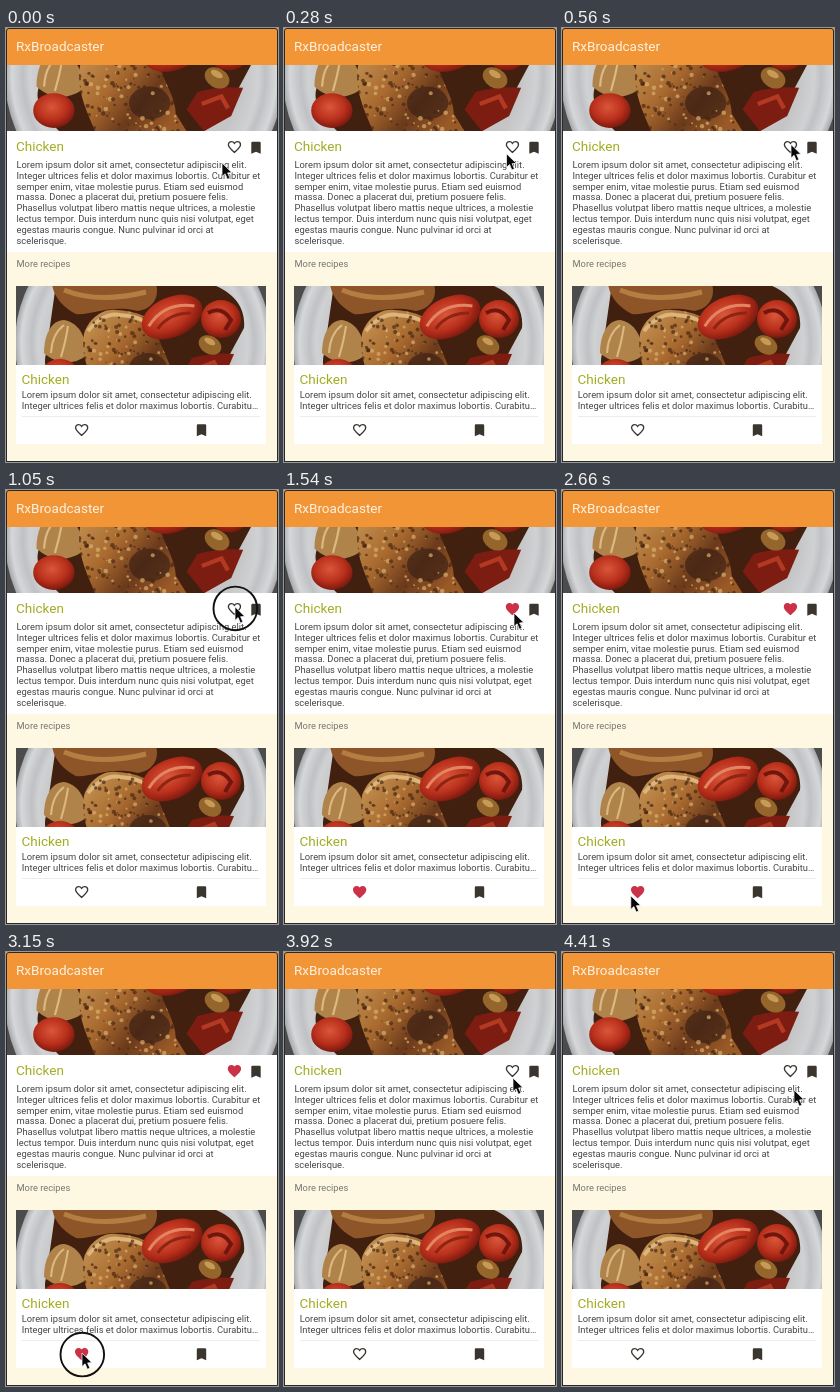
Animation of 272 by 434 pixels, one loop 4.48 s. Source, as an HTML page:

```html
<!DOCTYPE html>
<html lang="en">
<head>
<meta charset="utf-8">
<title>Recipes</title>
<style>
html, body { margin: 0; width: 100%; height: 100%; overflow: hidden; background: #fef7e2; }
svg { display: block; width: 272px; height: 434px; font-family: Roboto, "Open Sans", sans-serif; }
.title { font-size: 13.5px; fill: #a3ad24; }
.body { font-size: 9.36px; fill: #454545; }
.off { fill: none; stroke: #3b3530; stroke-width: 2; }
.on { fill: #cb3247; stroke: none; }
</style>
</head>
<body>
<svg viewBox="0 0 272 434">
  <defs>
    <clipPath id="cardClip"><rect x="10" y="258" width="250" height="79"/></clipPath>
    <clipPath id="topClip"><rect y="37" width="272" height="66"/></clipPath>
    <clipPath id="meatClip">
      <path id="meatShape" d="M78 306C82 292 96 280 110 282C128 283 146 288 150 300C153 318 166 334 166 350L176 366H92C84 348 74 326 78 306Z"/>
    </clipPath>
    <radialGradient id="plate" gradientUnits="userSpaceOnUse" cx="137" cy="315" r="128">
      <stop offset=".7" stop-color="#c5c5c6"/>
      <stop offset=".82" stop-color="#d0d1d3"/>
      <stop offset=".87" stop-color="#bfc1c4"/>
      <stop offset=".95" stop-color="#d5d7d9"/>
      <stop offset="1" stop-color="#a5a8ab"/>
    </radialGradient>
    <linearGradient id="meat" x1="0" y1="0" x2="1" y2=".7">
      <stop offset="0" stop-color="#c99a58"/>
      <stop offset=".45" stop-color="#a8692f"/>
      <stop offset=".72" stop-color="#6b3a1b"/>
      <stop offset="1" stop-color="#9a5a28"/>
    </linearGradient>
    <radialGradient id="tomato" cx=".45" cy=".4" r=".62">
      <stop offset="0" stop-color="#d9573a"/>
      <stop offset=".6" stop-color="#b92f1b"/>
      <stop offset="1" stop-color="#76170e"/>
    </radialGradient>
    <g id="photo">
      <rect x="10" y="258" width="250" height="109" fill="#4d4c4d"/>
      <circle cx="137" cy="315" r="128" fill="url(#plate)"/>
      <path d="M50 256H205C228 264 240 280 238 300L224 326L214 352L190 367H60C44 352 36 340 40 326Z" fill="#41200f"/>
      <path d="M38 325C38 306 46 292 58 292C72 294 82 310 80 328C66 338 50 336 38 325Z" fill="#b0834a"/>
      <path d="M45 325Q46 306 58 297M55 329Q60 312 62 298" fill="none" stroke="#dcb982" stroke-width="2"/>
      <path d="M46 256H150C154 270 146 281 132 283C104 276 84 288 70 286C58 280 48 270 46 256Z" fill="#8d5528"/>
      <path d="M58 262Q92 276 140 264" fill="none" stroke="#b67d42" stroke-width="5"/>
      <ellipse cx="54" cy="347" rx="19" ry="16" fill="url(#tomato)"/>
      <use href="#meatShape" fill="url(#meat)"/>
      <path d="M82 303Q98 284 114 287Q133 288 145 297" fill="none" stroke="#dbb57c" stroke-width="4"/>
      <ellipse cx="142" cy="340" rx="19" ry="15" fill="#3a2015" opacity=".65"/>
      <g id="pepper" clip-path="url(#meatClip)"></g>
      <g transform="rotate(-24 166 289)">
        <ellipse cx="166" cy="289" rx="32" ry="20" fill="url(#tomato)"/>
        <path d="M141 288Q165 272 191 288" fill="none" stroke="#e38562" stroke-width="3"/>
        <path d="M148 294Q165 284 185 293" fill="none" stroke="#8e2412" stroke-width="3"/>
      </g>
      <ellipse cx="215" cy="291" rx="20" ry="19" fill="url(#tomato)"/>
      <path d="M202 285Q216 277 225 292L219 302" fill="none" stroke="#70160f" stroke-width="4"/>
      <path d="M186 330Q206 324 228 326L217 352L192 366L176 346Z" fill="#7d1c10"/>
      <path d="M190 341L208 334L214 345" fill="none" stroke="#b23a22" stroke-width="4"/>
      <g transform="rotate(30 204 317)">
        <ellipse cx="204" cy="317" rx="12" ry="9" fill="#94662c"/>
        <ellipse cx="202" cy="314" rx="6" ry="3" fill="#c79b56"/>
      </g>
    </g>
    <path id="heart" d="M12 20L10.5 18.6C5.8 14.4 3 11.8 3 8.5C3 5.9 4.9 4 7.5 4C9.3 4 11 5 12 6.5C13 5 14.7 4 16.5 4C19.1 4 21 5.9 21 8.5C21 11.8 18.2 14.4 13.5 18.6Z"/>
    <path id="fullHeart" d="M12 21.3L10.5 20C5.4 15.4 2 12.3 2 8.5C2 5.4 4.4 3 7.5 3C9.2 3 10.9 3.8 12 5.1C13.1 3.8 14.8 3 16.5 3C19.6 3 22 5.4 22 8.5C22 12.3 18.6 15.4 13.5 20Z"/>
    <path id="mark" d="M1.2 0H8.2Q9.4 0 9.4 1.2V12L4.7 10L0 12V1.2Q0 0 1.2 0Z" fill="#3b3530"/>
  </defs>

  <rect width="272" height="434" fill="#fef7e2"/>
  <rect y="103" width="272" height="121" fill="#fff"/>
  <g clip-path="url(#topClip)">
    <use href="#photo" transform="translate(-10.9 -295) scale(1.088)"/>
  </g>
  <rect width="272" height="37" fill="#f29537"/>
  <text x="10" y="23" font-size="13.5" fill="#fdf1e0">RxBroadcaster</text>
  <text class="title" x="10" y="123">Chicken</text>
  <g id="story"></g>
  <text x="10.5" y="239" font-size="9.3" fill="#777">More recipes</text>

  <rect x="10" y="258" width="250" height="158" fill="#fff"/>
  <g clip-path="url(#cardClip)"><use href="#photo"/></g>
  <text class="title" x="15.5" y="356">Chicken</text>
  <g id="teaser"></g>
  <path d="M16 388.5H254" stroke="#ececec"/>

  <use class="heart" transform="translate(220.4 111) scale(.67)"/>
  <use class="heart" transform="translate(67.6 394) scale(.67)"/>
  <use href="#mark" x="245.3" y="113.7"/>
  <use href="#mark" x="190.8" y="396.2"/>

  <path d="M.5 434V3Q.5 .5 3 .5H269Q271.5 .5 271.5 3V433.5H0" stroke="#2b2926" fill="none"/>

  <g id="pointer">
    <circle id="ring" cx=".3" cy="1.6" r="21.8" fill="none" stroke="#111" stroke-width="1.9"/>
    <path d="M0 0V13.6L3.1 10.8L5.4 16.2L7.9 15.1L5.6 9.9L9.8 9.6Z" fill="#080808" stroke="#fff" stroke-width=".7"/>
  </g>
</svg>
<script>
const LOOP = 4480, STEP = 70;
const NS = "http://www.w3.org/2000/svg";
const $ = id => document.getElementById(id);

function add(parent, tag, attrs, text = "") {
  const el = document.createElementNS(NS, tag);
  for (const k in attrs) el.setAttribute(k, attrs[k]);
  el.textContent = text;
  parent.append(el);
}

function lines(parent, rows, x, y, pitch) {
  rows.forEach((row, i) => add(parent, "text", { x, y: y + i * pitch, class: "body" }, row));
}

lines($("story"), [
  "Lorem ipsum dolor sit amet, consectetur adipiscing elit.",
  "Integer ultrices felis et dolor maximus lobortis. Curabitur et",
  "semper enim, vitae molestie purus. Etiam sed euismod",
  "massa. Donec a placerat dui, pretium posuere felis.",
  "Phasellus volutpat libero mattis neque ultrices, a molestie",
  "lectus tempor. Duis interdum nunc quis nisi volutpat, eget",
  "egestas mauris congue. Nunc pulvinar id orci at",
  "scelerisque."
], 10.5, 140, 10.83);
lines($("teaser"), [
  "Lorem ipsum dolor sit amet, consectetur adipiscing elit.",
  "Integer ultrices felis et dolor maximus lobortis. Curabitu…"
], 15.7, 370, 11);

// Seeded seasoning over the chicken
let seed = 11;
const rnd = () => (seed = seed * 16807 % 2147483647) / 2147483647;
for (let i = 0; i < 170; i++) {
  add($("pepper"), "circle", {
    cx: 76 + rnd() * 94, cy: 284 + rnd() * 82, r: .6 + rnd() * 1.6,
    fill: i % 3 ? "#4a2813" : "#d9ae6c", opacity: .7
  });
}

// Pointer stops: time, x, y
const stops = [
  [0, 216, 135], [560, 229, 116.5], [1470, 229, 117],
  [1540, 230, 123], [2030, 63, 392], [2240, 61, 394], [2520, 67, 407],
  [3010, 76, 401], [3500, 76, 401], [3850, 229, 124], [3920, 229, 126], [4410, 232, 138]
];

function pointerAt(t) {
  const i = stops.findIndex(s => s[0] > t);
  if (i < 0) return stops[stops.length - 1].slice(1);
  const [t0, x0, y0] = stops[i - 1], [t1, x1, y1] = stops[i];
  const p = (t - t0) / (t1 - t0), e = p * p * (3 - 2 * p);
  return [x0 + (x1 - x0) * e, y0 + (y1 - y0) * e];
}

const within = (t, a, b) => t >= a && t < b;
const hearts = document.querySelectorAll(".heart");

function draw(ms) {
  const t = Math.floor(ms % LOOP / STEP) * STEP;
  const [x, y] = pointerAt(t);
  const liked = within(t, 1190, 3220);
  const pressed = within(t, 1050, 1190) || within(t, 3080, 3220);
  $("pointer").setAttribute("transform", `translate(${x} ${y})`);
  $("ring").setAttribute("visibility", pressed ? "visible" : "hidden");
  for (const h of hearts) {
    h.setAttribute("class", "heart " + (liked ? "on" : "off"));
    h.setAttribute("href", liked ? "#fullHeart" : "#heart");
  }
}

const start = performance.now();
function tick() {
  draw(performance.now() - start);
  requestAnimationFrame(tick);
}
tick();
</script>
</body>
</html>
```
